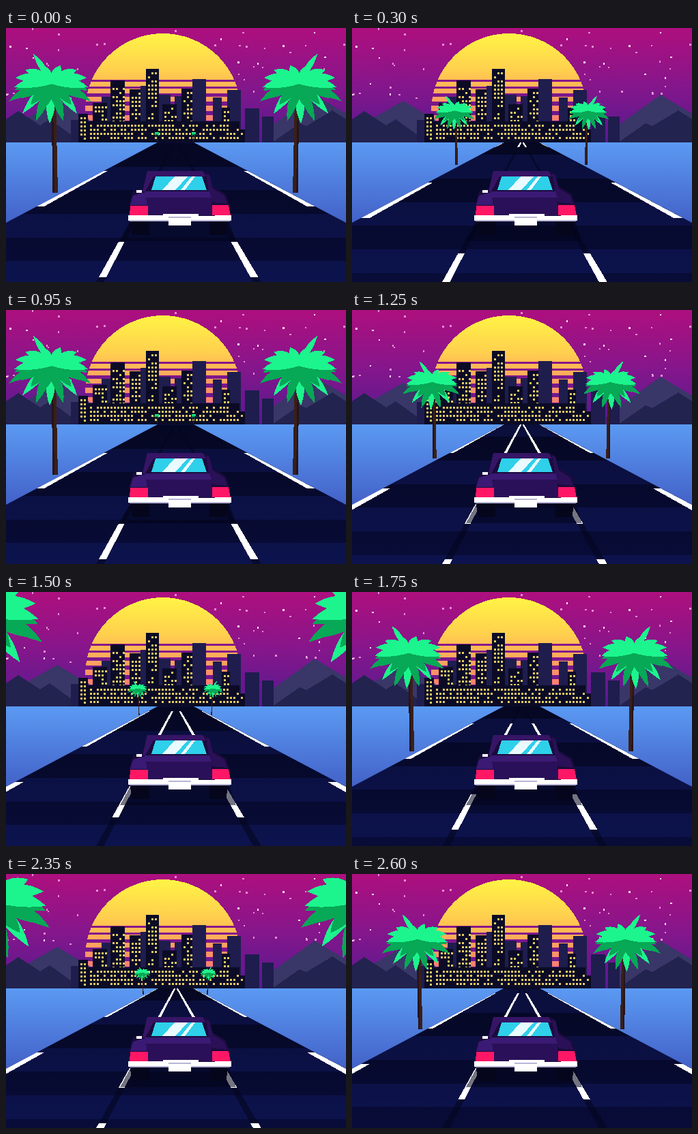
An HTML page that plays this animation: 498x373 px, repeating every 2650 ms.

```html
<!DOCTYPE html>
<html lang="en">
<head>
<meta charset="utf-8">
<title>Night drive</title>
<style>
html, body { margin: 0; width: 100%; height: 100%; overflow: hidden; background: #080b30; }
svg { display: block; width: 498px; height: 373px; }
</style>
</head>
<body>
<svg viewBox="0 0 498 373" shape-rendering="crispEdges">
  <defs>
    <linearGradient id="sky" gradientUnits="userSpaceOnUse" x1="0" y1="0" x2="0" y2="168">
      <stop offset="0" stop-color="#ae0f7e"/>
      <stop offset=".5" stop-color="#86168b"/>
      <stop offset="1" stop-color="#551a90"/>
    </linearGradient>
    <linearGradient id="sunlight" gradientUnits="userSpaceOnUse" x1="0" y1="8" x2="0" y2="165">
      <stop offset="0" stop-color="#fff445"/>
      <stop offset=".35" stop-color="#ffcf4e"/>
      <stop offset=".65" stop-color="#ff9a62"/>
      <stop offset="1" stop-color="#fb5c8a"/>
    </linearGradient>
    <linearGradient id="sea" gradientUnits="userSpaceOnUse" x1="0" y1="168" x2="0" y2="290">
      <stop offset="0" stop-color="#5b9af3"/>
      <stop offset="1" stop-color="#425fc6"/>
    </linearGradient>
    <linearGradient id="tar" gradientUnits="userSpaceOnUse" x1="0" y1="168" x2="0" y2="373">
      <stop offset="0" stop-color="#050722"/>
      <stop offset="1" stop-color="#080c38"/>
    </linearGradient>
    <clipPath id="roadShape"><path d="M222 168H275L498 286V373H0V286Z"/></clipPath>
    <g id="palm"></g>
  </defs>

  <rect width="498" height="168" fill="url(#sky)"/>
  <g id="stars"></g>
  <circle cx="230" cy="122" r="114" fill="url(#sunlight)"/>
  <g id="slits" fill="url(#sky)"></g>
  <path fill="#393668" d="M0 150L75 107L130 140V168H0ZM380 168V150L452 98L498 126V168Z"/>
  <path fill="#23234f" d="M0 134L18 122L50 143L64 134L100 160V168H0ZM390 168L430 140L440 144L478 121L498 134V168Z"/>
  <g id="city"></g>
  <rect y="168" width="498" height="205" fill="url(#sea)"/>
  <g clip-path="url(#roadShape)">
    <rect y="168" width="498" height="205" fill="url(#tar)"/>
    <path id="bands" fill="#2230a0" fill-opacity=".2"/>
    <path id="tracks" fill="#04061f" fill-opacity=".6"/>
    <path id="lines" fill="#fff"/>
  </g>
  <path fill="#03041a" fill-opacity=".55" d="M184 282H326L337 313H167Z"/>
  <g id="palms"></g>

  <g id="car">
    <path fill="#05051c" d="M181 282H210V304H185ZM298 282H326L322 304H298Z"/>
    <path fill="#1a0b3c" d="M186 240L200 236L207 210H288L298 214L302 232L322 244L328 262V282H181V258Z"/>
    <path fill="#361566" d="M207 210H288L293 218H216L204 240H200Z"/>
    <path fill="#2a1056" d="M293 214L298 216L303 236L320 246L324 258L302 256L297 240Z"/>
    <path fill="#2fd0ea" d="M219 218H287L294 238H213Z"/>
    <path fill="#e9fbff" d="M247 218H266L248 238H229ZM272 218H277L262 238H256Z"/>
    <path fill="#3a1a74" d="M203 240H298L301 249H205ZM186 246L205 241L208 260H182Z"/>
    <path fill="#2a1058" d="M205 249H301L302 275H208Z"/>
    <path fill="#ff1766" d="M182 261H208V275H181ZM302 260H326L329 275H302Z"/>
    <path fill="#fff" d="M179 275H230V273H282V276L330 275V283H179ZM238 277H271V290H238ZM191 238H199V242H191Z"/>
    <path fill="#b9b5d6" d="M181 282H238V284H181ZM271 282H328V284H271ZM238 277H271V279H238Z"/>
  </g>
</svg>

<script>
const $ = id => document.getElementById(id);
const range = (n, f) => Array.from({ length: n }, (_, i) => f(i));
const rect = (x, y, w, h, fill) => `<rect x="${x}" y="${y}" width="${w}" height="${h}" fill="${fill}"/>`;
let seed = 7;
const rand = () => (seed = seed * 16807 % 2147483647) / 2147483647;

// ---- sky and city ----
$('stars').innerHTML = range(70, i =>
  rect(rand() * 496, rand() * 105, 2.5, 2.5, i % 3 ? '#e58fd0' : '#ffe3f6')).join('');

$('slits').innerHTML = range(7, i => rect(114, 76 + 9 * i + .6 * i * i, 232, 3 + .8 * i, 'url(#sky)')).join('');

function tower(x, w, top, lit) {
  let s = rect(x, top, w, 168 - top, lit ? '#0b0b26' : '#1e1d4e');
  for (let y = top + 5; lit && y < 164; y += 6)
    for (let c = x + 3; c < x + w - 2; c += 5)
      if (rand() < .7) s += rect(c, y, 2.5, 3, '#e6cb62');
  return s;
}
// left, width, top
const dark = [[95, 11, 135], [140, 13, 101], [197, 9, 85], [224, 17, 98], [247, 10, 100],
  [273, 20, 75], [303, 13, 102], [324, 20, 91], [350, 21, 118], [375, 17, 130]];
const lit = [[106, 244, 149], [106, 14, 126], [127, 21, 110], [153, 21, 77], [181, 16, 90],
  [205, 19, 60], [229, 21, 112], [257, 16, 89], [316, 12, 117], [120, 222, 137]];
$('city').innerHTML = dark.map(b => tower(...b, false)).join('') + lit.map(b => tower(...b, true)).join('');

// ---- palm, drawn around the foot of its trunk ----
function frond(x, y, w, fill) {
  const cx = -5, cy = -160, len = Math.hypot(x - cx, y - cy);
  const nx = (cy - y) / len * w, ny = (x - cx) / len * w;
  const mx = (x + cx) / 2, my = (y + cy) / 2 - Math.abs(x - cx) * .15;
  return `<path fill="${fill}" d="M${cx} ${cy}Q${mx + nx} ${my + ny} ${x} ${y}Q${mx - nx} ${my - ny} ${cx} ${cy}"/>`;
}
const fan = (n, from, to, rx, ry, w, fill) => range(n, i => {
  const a = (from + (to - from) * i / (n - 1)) * Math.PI / 180;
  return frond(-6 + rx * Math.cos(a), -160 - ry * Math.sin(a), w, fill);
}).join('');
const LIGHT = '#1cf58d', GREEN = '#07a856';
$('palm').innerHTML =
  '<path fill="#3a1f18" d="M-5 -140H1L4 0H-4Z"/><path fill="#25141c" d="M-5 -140H-3L-1 0H-4Z"/>' +
  range(7, i => frond(-8 + 20 * (i - 3), -102 - 3.6 * (i - 3) ** 2, 13, i % 2 ? LIGHT : GREEN)).join('') +
  fan(8, 195, 345, 56, 36, 14, GREEN) +
  fan(8, 190, -10, 55, 28, 14, LIGHT) + frond(-32, -204, 9, LIGHT);

// ---- motion ----
const LOOP = 2650, TICK = 50, DASH = 52, STEP = DASH / 3, CYCLE = 24;
// distance driven (CYCLE = one palm spacing) at a few times
const drive = [[0, 0], [950, 48], [1250, 67], [LOOP, 144]];

function distance(t) {
  const i = drive.findIndex(k => k[0] > t);
  const [t0, d0] = drive[i - 1], [t1, d1] = drive[i];
  return d0 + (d1 - d0) * (t - t0) / (t1 - t0);
}

// slanted stroke between two heights; a and b are [x, slope] of its sides
function stroke(y0, y1, [a, b]) {
  const p = (s, y) => `${s[0] + s[1] * (y - 168)} ${y}`;
  return `M${p(a, y0)}L${p(b, y0)}L${p(b, y1)}L${p(a, y1)}Z`;
}
const lanes = [[[246, -.556], [248.5, -.513]], [[249.5, .548], [252, .594]]];
const edges = [[[222, -1.89], [223, -1.776]], [[274, 1.776], [275, 1.89]]];
$('tracks').setAttribute('d', lanes.map(s => stroke(168, 373, s)).join(''));

function palmPair(d) {
  const dx = 26.5 + 149.5 * (d / CYCLE) ** 1.7;
  const y = 167 + (dx - 26.5) / 1.99, k = (dx - 14) / 162;
  return [-1, 1].map(side =>
    `<use href="#palm" transform="translate(${248 + side * dx} ${y}) scale(${-side * k} ${k})"/>`).join('');
}

function draw(now) {
  const d = distance(Math.floor(now % LOOP / TICK) * TICK);
  const n = Math.floor(d / 2 + 1e-6);

  let lines = '';
  for (let y = 2 + n % 6 * STEP; y < 373; y += 2 * DASH)
    if (y + DASH > 168)
      for (const s of [...lanes, ...edges]) lines += stroke(Math.max(y, 168), y + DASH, s);
  $('lines').setAttribute('d', lines);

  let bands = '';
  for (let y = 65 + n % 4 * STEP; y < 373; y += 4 * STEP) bands += `M0 ${y}H498V${y + 2 * STEP}H0Z`;
  $('bands').setAttribute('d', bands);

  const near = d % CYCLE;
  $('palms').innerHTML = palmPair(near) + palmPair(near + CYCLE);
}

function loop() {
  draw(performance.now());
  requestAnimationFrame(loop);
}
loop();
</script>
</body>
</html>
```
